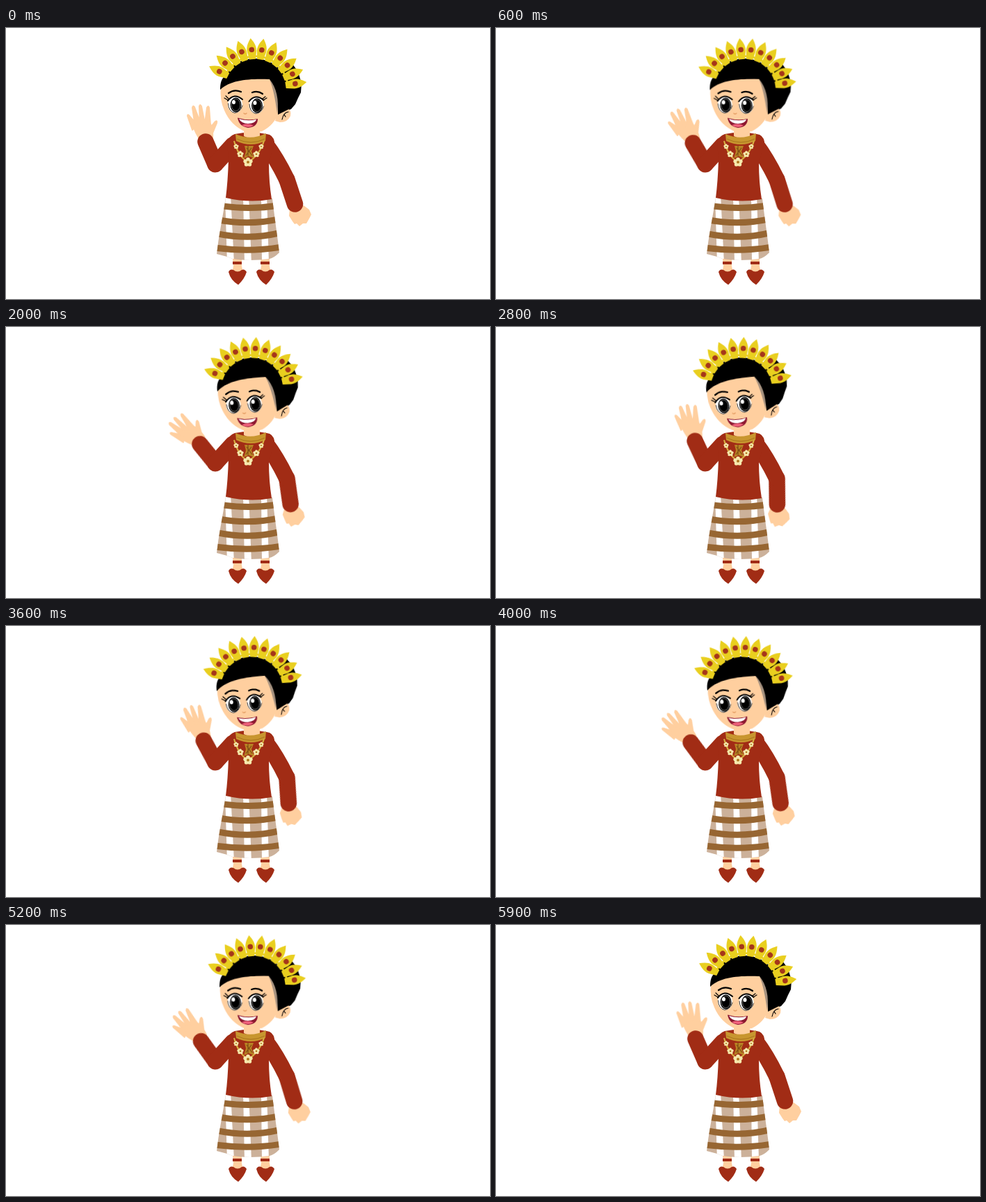
Write an HTML page that moves like this. It is 696 px wide and 391 px high and loops after 6 s.

```html
<!DOCTYPE html>
<html lang="en">
<head>
<meta charset="utf-8">
<title>Waving dancer</title>
<style>
  html, body { margin: 0; width: 100%; height: 100%; overflow: hidden; background: #fff; }
  svg { display: block; width: 100%; height: 100%; }
  .skin { fill: #ffcf9f; }
  .red { fill: #a12c15; }
  .sleeve { fill: none; stroke: #a12c15; stroke-width: 23.5; stroke-linecap: round; stroke-linejoin: round; }
  .finger { fill: #ffcf9f; stroke: #ffcf9f; stroke-width: 2; stroke-linejoin: round; }
  .line { fill: none; stroke: #000; stroke-linecap: round; }
  .band { fill: none; stroke: #976632; stroke-width: 9; }

  #head, #wave, #palm, #rest { animation: 6s infinite cubic-bezier(.37, 0, .63, 1); }
  #head { transform-origin: 354px 140px; animation-name: tilt; }
  #wave { transform-origin: 301px 196px; animation-name: wave; }
  #palm { transform-origin: 287px 160px; animation-name: palm; }
  #rest { transform-origin: 404px 219px; animation-name: swing; }

  @keyframes tilt { 0%, 100% { transform: rotate(0deg); } 50% { transform: rotate(-6.5deg); } }
  @keyframes wave {
    0%, 51.67%, 100% { transform: rotate(0deg); }
    25%, 76.67% { transform: rotate(-20deg); }
  }
  @keyframes palm {
    0%, 51.67%, 100% { transform: rotate(0deg); }
    25%, 76.67% { transform: rotate(-28deg); }
  }
  @keyframes swing {
    0% { transform: rotate(0deg); animation-timing-function: cubic-bezier(.6, 0, .75, 1); }
    50% { transform: rotate(18deg); animation-timing-function: cubic-bezier(.25, 0, .4, 1); }
    100% { transform: rotate(0deg); }
  }
</style>
</head>
<body>
<svg viewBox="0 0 696 391" preserveAspectRatio="none">
  <defs>
    <clipPath id="skirt"><path d="M316 244L383 246C386 272 390 298 393 324Q385 332 379 333Q350 337 326 333L318 330L303 326C306 298 312 272 316 244Z"/></clipPath>
    <g id="foot">
      <path class="skin" d="M-7 333H6V344L8 352H-8L-6 344Z"/>
      <path class="red" d="M-7 337H6V341H-7ZM-13 352Q-11 347-6 349Q0 354 6 349Q10 347 13 352Q10 362 1 370.500Q-10 364-13 352Z"/>
    </g>
    <g id="feather">
      <path fill="#e9cf1f" d="M0-74.500C3-70 7.500-64 6.800-56L4.500-44H-4.500L-6.800-56C-7.500-64-3-70 0-74.500Z"/>
      <circle cy="-58" r="3.800" fill="#a5361a"/>
    </g>
    <g id="flower">
      <g fill="#f6e9ac">
        <circle cx="0" cy="-3" r="2.200"/><circle cx="2.900" cy="-.9" r="2.200"/><circle cx="1.800" cy="2.500" r="2.200"/>
        <circle cx="-1.800" cy="2.500" r="2.200"/><circle cx="-2.900" cy="-.9" r="2.200"/><circle r="2.500"/>
      </g>
      <circle r="1.500" fill="#b0781f"/>
    </g>
  </defs>

  <use href="#foot" x="333"/>
  <use href="#foot" x="373"/>

  <g clip-path="url(#skirt)">
    <rect x="300" y="240" width="96" height="100" fill="#ccb19a"/>
    <g id="stripes" fill="#fff"></g>
    <path class="band" d="M300 255Q350 264 396 255M300 276Q350 286 396 275M300 296Q350 307 396 295M300 317Q350 324 396 316"/>
  </g>

  <!-- waving arm -->
  <g id="wave">
    <g id="palm">
      <path class="skin" d="M268 142Q282 132 295 138Q299 148 298 160L278 162Q272 152 268 142Z"/>
      <path class="finger" d="M268 147L261 127Q261 124 263 126L275 140ZM272 142L268 115Q269 111 271 114L280 138ZM279 139L278 113Q279 109 281 113L286 138ZM286 138L289 115Q291 111 292 115L294 140ZM292 146L301 135Q304 133 303 137L296 154Z"/>
    </g>
    <path class="sleeve" d="M301 196.500L287 164"/>
  </g>
  <path class="sleeve" d="M326 169L301 196.500"/>

  <!-- resting arm -->
  <g id="rest">
    <path class="skin" d="M408 260L407 271L412 279L415 283L418 282L422 286L427 282L432 282L436 275L439 269L436 262L428 256Z"/>
    <path class="sleeve" d="M404 219L415.500 254"/>
  </g>
  <path class="sleeve" d="M373 167Q389 188 403.500 218"/>

  <path class="red" d="M329 153Q352 148 375 153Q384 154 386 164L378 195Q378 222 382 247Q350 253 316 245Q319 222 320 190L318 164Q321 156 329 153Z"/>

  <path class="skin" d="M342 143H365V156Q354 163 342 156Z"/>
  <path fill="#c8962f" d="M330 153Q352 163 374 152L373 163Q352 173 331 163Z"/>
  <path fill="none" stroke="#a8741d" d="M332 160Q352 170 372 160"/>
  <path fill="#b98224" d="M343 170H356L353 178L357 188L349 185L342 188L345 178Z"/>
  <path fill="none" stroke="#7d4d14" stroke-width="1.200" d="M346 173L354 184M353 173L345 184M348 170V185"/>
  <path fill="none" stroke="#d8b044" stroke-width="2" d="M328 163Q333 184 348 194Q365 183 371 163"/>
  <use href="#flower" transform="translate(331 171) scale(.7)"/>
  <use href="#flower" transform="translate(337 182) scale(.9)"/>
  <use href="#flower" transform="translate(348 193.500) scale(1.300)"/>
  <use href="#flower" transform="translate(360 182) scale(.9)"/>
  <use href="#flower" transform="translate(367 171) scale(.7)"/>

  <g id="head">
    <path d="M388 62L404 48L412 52L420 63L425 80L424 93L420 101L416 110L410 117L390 125Z"/>
    <path class="skin" d="M390 121Q396 114 405 116Q411 119 409 127Q405 136 394 136L387 134Z"/>
    <path class="line" stroke-width="1.200" d="M397 132Q399 122 406 121M400 125L402 128"/>
    <path class="skin" d="M309 84Q307 104 314 119Q323 140 343 149Q354 152 368 149Q386 140 392 122L384 72L340 70Z"/>
    <path d="M308 89C308 79 310 73 315 69C326 50 342 44 358 44C386 45 401 62 404 84L409 116L391 125C392 105 387 88 379 74C352 73 324 74 308 89Z"/>
    <path fill="#a5917f" d="M379 74C384 87 387 101 390 124C393 104 389 86 379 74Z"/>

    <path fill="none" stroke="#e9cf1f" stroke-width="3" d="M315 70A47 47 0 0 1 405.500 87"/>
    <g id="crown" transform="translate(358.500 89)"></g>

    <path class="line" stroke-width="2.200" d="M320 94Q328 88 338 92M354 93Q362 90 369 95"/>
    <g id="eye">
      <ellipse cx="329.500" cy="110.500" rx="10.500" ry="12" fill="#fff"/>
      <path class="line" stroke-width="2" d="M319 105Q328 93 340 103"/>
      <path class="line" stroke-width=".8" d="M319.500 109Q320 120 328.500 122.500Q337 122 340 112"/>
      <ellipse cx="330.500" cy="111" rx="8" ry="10.400"/>
      <ellipse cx="330.500" cy="111" rx="6.400" ry="8.600" fill="none" stroke="#999" stroke-width=".7"/>
      <ellipse cx="327.500" cy="107" rx="2.500" ry="3" fill="#fff"/>
    </g>
    <use href="#eye" x="30.500" y="1"/>
    <path class="line" stroke-width="1.200" d="M319 104L314 101M320 102L316 98M370 104L375 101M369 102L373 99"/>
    <path fill="none" stroke="#e6a067" stroke-width="1.400" stroke-linecap="round" d="M342 123Q344 125 346 123"/>
    <path fill="#8c1830" d="M333 129.500Q347 134 362 131Q362 143 348 144Q335 142 333 129.500Z"/>
    <path fill="#fff" d="M335 131Q347 135 360 132Q359 137.500 348 138Q338 137.500 335 131Z"/>
    <path fill="#f0627c" d="M339 140Q348 137 356 140.500Q352 143 348 143Q343 143 339 140Z"/>
  </g>
</svg>
<script>
  const add = (parent, tag, attrs) => {
    const el = document.createElementNS('http://www.w3.org/2000/svg', tag);
    for (const key in attrs) el.setAttribute(key, attrs[key]);
    document.getElementById(parent).append(el);
  };

  for (let i = 0; i < 11; i++) {
    add('crown', 'use', { href: '#feather', transform: `rotate(${-63 + i * 14.45})` });
  }

  // Pale stripes hang almost straight and widen towards the hem.
  for (let i = 0; i < 3; i++) {
    const top = 315 + i * 26, hem = 318 + i * 25;
    add('stripes', 'path', { d: `M${top} 240h8L${hem + 10} 340h-10Z` });
  }
</script>
</body>
</html>
```
